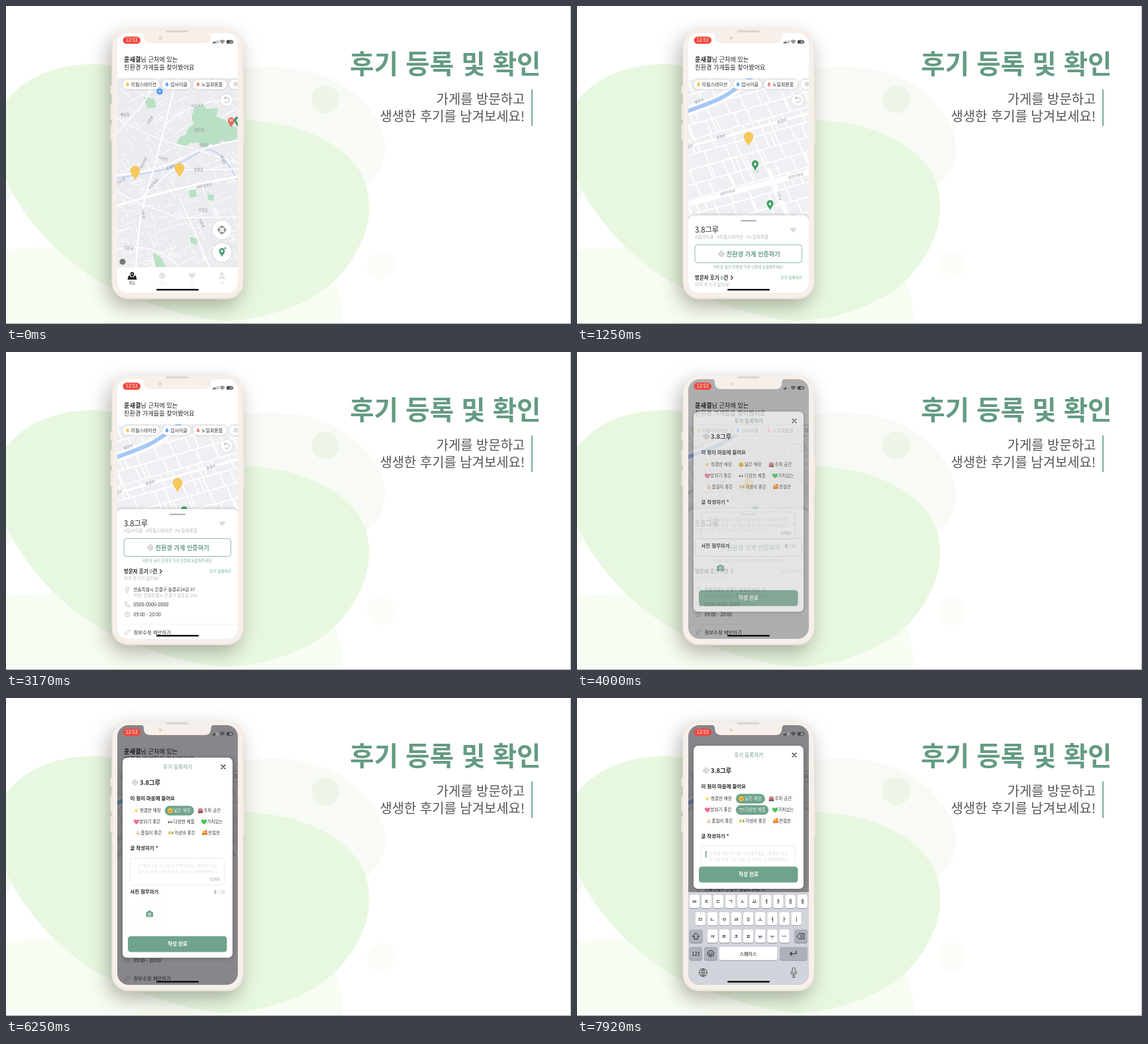
An HTML page that plays this animation: 853x480 px, repeating every 8 s.

```html
<!DOCTYPE html>
<html lang="ko">
<head>
<meta charset="utf-8">
<style>
html, body { margin: 0; width: 100%; height: 100%; overflow: hidden; background: #fff; }
svg { display: block; width: 853px; height: 480px; }
text { font-family: "Noto Sans CJK KR", "Noto Sans CJK", "Noto Sans", sans-serif; white-space: pre; }
.lift { filter: drop-shadow(0 .8px 1.5px rgba(0,0,0,.16)); }
</style>
</head>
<body>
<svg id="stage" viewBox="0 0 853 480"></svg>
<script>
const GREEN = '#649b82', BUTTON = '#70a38b', INK = '#222', PALE = '#b4b4b4';
const LOOP = 8000;

// Markup helpers
const text = (x, y, size, str, fill = INK, more = '') =>
  `<text x="${x}" y="${y}" font-size="${size}" fill="${fill}" ${more}>${str}</text>`;
const rect = (x, y, w, h, r, fill, more = '') =>
  `<rect x="${x}" y="${y}" width="${w}" height="${h}" rx="${r}" fill="${fill}" ${more}/>`;
const dot = (x, y, r, fill, more = '') => `<circle cx="${x}" cy="${y}" r="${r}" fill="${fill}" ${more}/>`;
const fillPath = (d, fill, more = '') => `<path d="${d}" fill="${fill}" ${more}/>`;
const line = (d, color, w = 1, more = '') =>
  `<path d="${d}" fill="none" stroke="${color}" stroke-width="${w}" stroke-linecap="round" stroke-linejoin="round" ${more}/>`;
const group = (id, body, more = '') => `<g id="${id}" ${more}>${body}</g>`;
const at = (x, y, body, s = 1) => `<g transform="translate(${x} ${y}) scale(${s})">${body}</g>`;
const MID = ' text-anchor="middle"', END = ' text-anchor="end"';
const BOLD = ' font-weight="700"', MEDIUM = ' font-weight="500"';

function seeded(seed) {
  return () => (seed = (seed * 16807) % 2147483647) / 2147483647;
}

// Icons, drawn around 0,0
const heart = color => fillPath('M0 4C-6 0-5-4-2.5-4Q-.8-4 0-2.3Q.8-4 2.5-4C5-4 6 0 0 4Z', color);
const drop = color => fillPath('M0-3.6C1-1.8 2.2-.6 2.2 1A2.2 2.2 0 0 1-2.2 1C-2.2-.6-1-1.8 0-3.6Z', color) +
  dot(0, 1.2, .8, '#fff', 'opacity=".7"');
const clover = [[0, -2.6], [-2.6, 0], [2.6, 0], [0, 2.6]].map(([x, y]) => dot(x, y, 2.5, '#d5d9d7')).join('') +
  line('M-2-2L2 2M2-2L-2 2', '#eef0ef', .5);
const marker = color => fillPath('M0 11.8C-1.6 7-7.2 3.2-7.2-2.7A7.2 7.2 0 0 1 7.2-2.7C7.2 3.2 1.6 7 0 11.8Z', color);
const tree = fillPath('M0-6L2.6-2.6H1.4L3.2 0H.7V2H-.7V0H-3.2L-1.4-2.6H-2.6Z', '#fff');
const face = dot(0, 0, 4, '#fbc638') + dot(-1.4, -.8, .6, '#6a4418') + dot(1.4, -.8, .6, '#6a4418') +
  line('M-1.7 1.2Q0 3 1.7 1.2', '#80501c', .8);
const eye = x => `<ellipse cx="${x}" rx="1.8" ry="2.6" fill="#fff" stroke="#bbb" stroke-width=".4"/>` + dot(x - .3, .4, 1.1, '#222');
const emoji = {
  spark: fillPath('M-.5-4Q0-.5 3 0Q0 .5-.5 4Q-1 .5-4 0Q-1-.5-.5-4Z', '#f8cf55') + dot(3, -3, .8, '#f8cf55'),
  face,
  car: fillPath('M-4 0L-2.6-3.4H2.6L4 0V3.5H-4Z', '#c9463f') + fillPath('M-2.8-.4L-2-2.5H2L2.8-.4Z', '#8fc3e6') +
    rect(-4, 2, 8, 1.6, .5, '#55474d') + dot(-2.6, 1, .7, '#fff') + dot(2.6, 1, .7, '#fff'),
  pink: heart('#f0719c'),
  eyes: eye(-2) + eye(2),
  green: heart('#42c655'),
  thumb: rect(-2.6, -.8, 5.6, 4.6, 1.5, '#f2cdb4') + line('M-1 0L.2-3.2', '#f2cdb4', 2),
  bill: rect(-4, -2.4, 8, 4.8, .6, '#d8bd68') + rect(-1.2, -2.4, 2.4, 4.8, 0, '#f3ecc9') + dot(2.4, 0, 1, '#6d9c5c'),
  love: face + at(-2.8, 2.3, heart('#ec4a55'), .38) + at(3, 1.8, heart('#ec4a55'), .38) + at(2.2, -3, heart('#ec4a55'), .35)
};

// Backdrop
const backdrop =
  fillPath('M330 100C380 88 450 85 505 117C550 145 577 190 572 222C567 255 550 268 530 277L330 275Z', '#f8fbf5') +
  fillPath('M0 368C80 355 420 370 495 412C505 432 508 455 508 480H0Z', '#f8fdf4') +
  dot(-6, 280, 14, '#f5faf2') +
  fillPath('M0 144C32 101 90 86 140 88C220 93 260 170 358 172C430 174 502 198 535 250C560 298 550 350 508 402C468 450 390 475 330 475C280 473 215 450 165 428C92 395 28 325 0 262Z', '#e8f8e0') +
  dot(482, 141, 21, '#edf5e8') + dot(566, 391, 21, '#fafdf8') +
  text(807.5, 102, 39.6, '후기 등록 및 확인', GREEN, END + BOLD) +
  text(783.3, 148, 19.9, '가게를 방문하고', '#555', END) +
  text(783.3, 173.5, 19.9, '생생한 후기를 남겨보세요!', '#555', END) +
  rect(793.2, 126, 1.7, 55, 0, GREEN) +
  rect(0, 479, 853, 1, 0, '#9a9a9a') + rect(852, 0, 1, 480, 0, '#b5b5b5');

// Maps
const label = (x, y, str, turn = 0, size = 5.2) =>
  text(x, y, size, str, '#888d96', `${MID} transform="rotate(${turn} ${x} ${y})"`);
const road = (d, w) => line(d, '#e3e5ea', w + .6) + line(d, '#fff', w);

function cityMap() {
  const rnd = seeded(77);
  let lanes = '';
  for (let i = 0; i < 430; i++) {
    const x = 165 + rnd() * 190, y = 105 + rnd() * 300;
    const a = (rnd() < .5 ? -.28 : 1.15) + (y < 230 ? -.3 : 0) + (rnd() - .5) * .2;
    const len = 6 + rnd() * 18;
    lanes += `M${x.toFixed(1)} ${y.toFixed(1)}l${(len * Math.cos(a)).toFixed(1)} ${(len * Math.sin(a)).toFixed(1)}`;
  }
  const park = '#bbdfc5';
  return rect(60, 60, 400, 440, 0, '#ebecef') + line(lanes, '#fff', .9) +
    fillPath('M257 208L262 198L272 194L274 186L283 178L280 168L285 152L298 150L303 155L320 154L318 166L332 173L340 180L349 184V200L335 206L326 203L318 211L309 208L300 214L290 206L278 207L270 213Z', park) +
    fillPath('M208 137L224 140L227 153L213 155Z M276 279L287 277L288 288L277 289Z M304 283L315 286L313 294L305 293Z M222 372L234 380L242 394H226Z M278 348L290 352L288 361L279 358Z M311 109L325 117L319 126L308 122Z', park) +
    line('M168 260Q215 252 243 246L272 232L298 217Q322 210 349 262', '#b4cef5', 1.5) +
    road('M168 255Q225 250 262 231T349 203', 2.2) + road('M160 304Q260 272 355 257', 3.6) +
    road('M196 400Q199 320 214 275T258 105', 2.6) + road('M160 165Q220 200 262 210T355 240', 1.6) +
    road('M160 200L205 150L232 105', 1.8) + road('M240 180Q280 140 355 140', 1.8) +
    road('M165 278L196 296L262 320L355 318', 1.6) + road('M262 290Q285 340 310 400', 2) +
    road('M160 370Q220 350 262 395', 1.6) + road('M196 296L250 248L355 246', 1.8) +
    label(292, 189, '달온동', 0, 5.6) + label(291, 249, '솔결로') + label(299, 212, '별온로') +
    label(300, 273, '남온순환로', -10) + label(209, 238, '새온대로', -62) + label(237, 232, '다온로', 15) +
    label(249, 245, '온결로', -18) + label(180, 166, '해온동') + label(289, 152, '여온대로', -8) +
    label(219, 173, '가온로', -60) + label(224, 270, '아온동길', -50) + label(298, 310, '은온로') +
    label(186, 367, '미온로') + label(205, 314, '나온로', 84) + label(294, 329, '라온로', 62) +
    label(326, 233, '해결로', 70) + label(174, 266, '온32길', -30);
}

function streetMap() {
  const rnd = seeded(41);
  let lanes = '';
  for (let v = -242; v < 260; v += 22) {
    lanes += `M-330 ${v}H330`;
    for (let u = -330 + rnd() * 20; u < 330; u += 13 + rnd() * 22) lanes += `M${u.toFixed(1)} ${v}v${rnd() < .3 ? 44 : 22}`;
  }
  return rect(-400, -300, 1500, 1200, 0, '#eff0f3') +
    `<g transform="matrix(.96 -.27 .4 .92 259 200)">${line(lanes, '#fff', 1.9)}</g>` +
    line('M120 174Q190 152 215 140T310 70', '#fff', 14) +
    line('M120 174Q190 152 215 140T310 70', '#a6c6f6', 6) +
    road('M20 254L500 120', 4) + road('M20 337L520 207', 8.5) + road('M290 248L350 400', 6) +
    label(185, 145, '별온로', -20) + label(218, 199, '솔결로', -17) + label(310, 175, '솔결로', -16) +
    label(169, 214, '솔결로', -16) + label(228, 283, '남온순환로', -15) + label(331, 258, '남온순환로', -15) +
    label(304, 287, '남온로', 80);
}

const chip = (x, w) => rect(x, 111, w, 14.5, 7.2, '#fff', 'class="lift" stroke="#e2e2e2" stroke-width=".6"');
const chipTag = (x, w, str, color) =>
  chip(x, w) + at(x + 7.5, 118, drop(color)) + text(x + 12.5, 120.8, 7, str, '#333');

const floating =
  dot(326, 338, 14.3, '#fff', 'class="lift"') + dot(326, 338, 5, 'none', 'stroke="#444" stroke-width="1"') +
  line('M326 331.8v3.6M326 340.6v3.6M319.8 338h3.6M328.6 338h3.6', '#444', 1) +
  dot(326, 372, 14.3, '#fff', 'class="lift"') + at(326, 371.5, marker('#579a7c') + dot(0, -2.6, 2.6, '#fff'), .62) +
  line('M329.5 365.5h3M331 364v3', '#579a7c', 1) +
  dot(176, 386, 4.5, '#777');

const tabs = rect(168, 394, 182, 45, 0, '#fff') + line('M168 394H350', '#e8e8e8', .6) +
  fillPath('M185 407h2l1.5 2.5h4L194 407h2l1.5 6h-14Z', INK) + at(190.5, 405.5, marker(INK) + dot(0, -2.6, 2.5, '#fff'), .4) +
  text(190.5, 420, 5.4, '지도', INK, MID) +
  dot(236, 407, 5, '#e6e6e6') + text(236, 420, 5.4, '후기', '#e4e4e4', MID) +
  at(281, 407, heart('#e2e2e2'), 1.15) + text(281, 420, 5.4, '찜', '#e4e4e4', MID) +
  dot(326, 404.5, 2.7, '#e2e2e2') + fillPath('M321 412Q321 408 326 408T331 412Z', '#e2e2e2') + text(326, 420, 5.4, 'MY', '#e4e4e4', MID);

// Store sheet, with its top edge at 0
const sheet = rect(168, 0, 182, 380, 8, '#fff', 'style="filter:drop-shadow(0 -1px 2px rgba(0,0,0,.2))"') +
  rect(247, 7, 24, 2.2, 1.1, '#b5b5b5') +
  text(178, 25.5, 11.2, '3.8그루', INK, MEDIUM) + at(326.5, 22, heart('#dcdcdc'), .95) +
  text(178, 35, 6.6, '#업사이클', PALE) + text(211, 35, 6.6, '#리필스테이션', PALE) + text(255, 35, 6.6, '#노일회용품', PALE) +
  rect(178, 44.5, 161.5, 27, 4, '#fff', 'stroke="#83b09b" stroke-width=".9"') + at(218, 58.2, clover) +
  text(225.5, 61.5, 9.2, '친환경 가게 인증하기', GREEN, BOLD) +
  text(259, 79.7, 5.5, '버튼을 눌러 친환경 가게 인증에 동참해주세요!', '#83aa97', MID) +
  text(178, 97, 7.5, `방문자 후기 <tspan fill="${GREEN}">0</tspan>건`, INK, BOLD) + line('M232.5 91.5l2.6 2.7l-2.6 2.7', INK, 1.1) +
  text(340, 96, 5.6, '후기 등록하기', '#5caa7c', END) + text(178, 106.5, 6.5, '아직 후기가 없어요!', PALE) +
  line('M183 126C180 122 180 117 183 117S186 122 183 126M182 120.5h2', '#aaa', .7) +
  text(192.5, 123.5, 6.6, '한솔특별시 은결구 솔결로24길 37', '#333') +
  text(192.5, 132.5, 6.4, '지번: 한솔특별시 은결구 달온동 264', PALE) +
  line('M180 141q-1 6 6 7l1-2l-2-1.5l-1 1q-2-1-2.4-2.5l1-1l-1-2Z', '#aaa', .7) + text(192.5, 147, 7.2, '0500-0000-0000', '#333') +
  dot(183, 159, 3.6, 'none', 'stroke="#aaa" stroke-width=".7"') + line('M183 157v2.2h1.8', '#aaa', .7) + text(192.5, 161.7, 7, '09:00 - 20:00', '#333') +
  line('M168 174H350', '#eee', .8) + line('M180 189l.8-2.6l4.4-4.4l1.8 1.8l-4.4 4.4Z', '#aaa', .7) +
  text(192.5, 188.5, 7.4, '정보수정 제안하기', '#333');

// Review dialog, with its top edge at 0
const choices = [
  [[189, 48, 197, 202, 'spark', '청결한 매장'], [240, 43.5, 248, 253, 'face', '넓은 매장'], [286, 42, 293.5, 298.5, 'car', '주차 공간']],
  [[189, 47, 197, 201.5, 'pink', '분위기 좋은'], [240, 49, 248, 253, 'eyes', '다양한 제품'], [291, 40, 299, 303.5, 'green', '가치있는']],
  [[189, 49, 199, 203.5, 'thumb', '품질이 좋은'], [241, 48, 249, 254, 'bill', '가성비 좋은'], [292, 36, 300, 305, 'love', '친절한']]
];
const choice = ([x, w, iconX, textX, icon, str], y, id) =>
  rect(x, y - 7, w, 14, 7, '#fff', `id="pill${id}" stroke="#f6f6f6" stroke-width=".6"`) +
  at(iconX, y, emoji[icon], .95) + text(textX, y + 2.4, 6.5, str, '#333', `id="word${id}"`);

const dialogBody =
  text(259, 16.6, 7.5, '후기 등록하기', GREEN, MID + MEDIUM) + line('M325 11l6 6M331 11l-6 6', INK, 1.1) +
  at(195, 37.5, clover) + text(202, 41, 9.3, '3.8그루', INK, BOLD) +
  text(187.5, 64.3, 7.4, '이 점이 마음에 들어요', INK, BOLD) +
  choices.map((row, r) => row.map((c, i) => choice(c, [80, 97, 113.5][r], r * 3 + i)).join('')).join('') +
  text(187.5, 139, 7.4, '글 작성하기 *', INK, BOLD) +
  rect(187.5, 151.5, 142, 41, 4, '#fff', 'stroke="#e6e6e6" stroke-width=".8"') +
  text(259, 165.3, 6.1, '가게에 대한 후기를 작성해주세요. (불쾌한 가입', '#dedede', MID) +
  text(259, 174, 6.1, '후기를 위해 다른 욕설 및 비하는 자제해주세요.)', '#dedede', MID) +
  rect(194, 158.5, 1.3, 10.5, .6, '#4f9474', 'id="caret"') +
  text(323, 186.2, 5.8, '0/500', '#999', END) +
  text(187.5, 205.2, 7.4, '사진 첨부하기', INK, BOLD) + text(330, 205, 6, '<tspan fill="#444">0</tspan> / 10', '#aaa', END) +
  rect(194, 217, 45, 38, 4, '#fefefe') +
  rect(211.5, 232.5, 10.5, 8, 1.2, BUTTON) + rect(214.5, 231, 4.5, 3, .8, BUTTON) + dot(216.7, 236.5, 2.3, '#fff') + dot(216.7, 236.5, 1.3, BUTTON);

const dialog = `<clipPath id="dialogClip"><rect id="dialogHole" x="176" width="166" rx="7"/></clipPath>` +
  `<rect id="dialogCard" x="176" width="166" rx="7" fill="#fff" style="filter:drop-shadow(0 1px 3px rgba(0,0,0,.25))"/>` +
  `<g clip-path="url(#dialogClip)">` + group('dialogBody', dialogBody) +
  group('submit', rect(176, -5, 166, 60, 0, '#fff') + rect(184, 0, 149.5, 24, 4.5, BUTTON) + text(259, 14.5, 7.6, '작성 완료', '#fff', MID + BOLD)) + '</g>';

// Keyboard
const key = (x, y, w, str, fill = '#fff', size = 8.5) =>
  rect(x, y + .8, w, 20, 3, '#898b91') + rect(x, y, w, 20, 3, fill) + text(x + w / 2, y + 13.2, size, str, '#111', MID);
const keyRow = (chars, x, y) => [...chars].map((c, i) => key(x + i * 18.1, y, 15.3, c)).join('');
const GREY = '#abb0ba';
const keyboard = rect(168, 293, 182, 145, 0, '#d1d4da') +
  keyRow('ㅂㅈㄷㄱㅅㅛㅕㅑㅐㅔ', 169.6, 297) + keyRow('ㅁㄴㅇㄹㅎㅗㅓㅏㅣ', 178.6, 323.3) + keyRow('ㅋㅌㅊㅍㅠㅜㅡ', 196.7, 349.6) +
  key(169.6, 349.6, 20, '', GREY) + line('M179.6 355l5 5h-2.6v4h-4.8v-4h-2.6Z', '#222', 1) +
  key(328, 349.6, 20, '', GREY) + line('M332 359.6l3.5-4h7.5v8h-7.5ZM337 357.6l4 4M341 357.6l-4 4', '#222', .9) +
  key(169.6, 375.8, 19.5, '123', GREY, 7) + key(192, 375.8, 20, '', GREY) +
  dot(202, 385.8, 4.6, 'none', 'stroke="#222" stroke-width="1"') + dot(200.3, 384.4, .7, '#222') + dot(203.7, 384.4, .7, '#222') + line('M199.5 387h5q-2.5 3-5 0', '#222', .8) +
  key(214.7, 375.8, 87.6, '스페이스', '#fff', 7) + key(306, 375.8, 42, '', GREY) + line('M331 382v4h-9M324.5 383.3l-2.7 2.7l2.7 2.7', '#222', 1.1) +
  dot(190.3, 414.5, 6, 'none', 'stroke="#444" stroke-width=".9"') + line('M184.3 414.5h12M190.3 408.5v12M186 410.5q4.3 2 8.6 0M186 418.5q4.3-2 8.6 0M190.3 408.5q-5.5 6 0 12q5.5-6 0-12', '#444', .7) +
  rect(325, 407, 4.4, 9, 2.2, 'none', 'stroke="#444" stroke-width=".9"') + line('M322.8 413q0 5.3 4.4 5.3t4.4-5.3M327.2 418.3v3M324.8 421.3h4.8', '#444', .9);

const status = rect(176.5, 46.3, 26.5, 10.8, 5.4, '#f0473d') + text(189.7, 54.3, 7.2, '12:53', '#fff', MID + MEDIUM) +
  rect(312, 54.4, 1.6, 2, .4, INK) + rect(314.4, 53.4, 1.6, 3, .4, INK) + rect(316.8, 52.6, 1.6, 3.8, .4, '#aaa') + rect(319.2, 51.6, 1.6, 4.8, .4, '#aaa') +
  line('M323.3 53.2q3.2-2.8 6.4 0M324.7 54.8q1.8-1.5 3.6 0', INK, 1.1) + dot(326.5, 56, .8, INK) +
  rect(333, 51.6, 9.5, 5.2, 1.5, '#444') + rect(337.5, 52.4, 4, 3.6, .6, '#999') + rect(343, 53.3, .8, 1.8, .4, '#555');

// Phone
const SHELL = '#f7efe9', EDGE = '#f0e6df';
const sideKey = (x, y, h) => rect(x, y, 3, h, 1, EDGE);
const shell =
  rect(159.5, 35.5, 199, 407, 25, EDGE, 'style="filter:drop-shadow(-5px 11px 15px rgba(70,62,54,.4))"') +
  sideKey(157.5, 120, 13) + sideKey(157.5, 147, 25) + sideKey(157.5, 179, 24) + sideKey(357, 157, 50) +
  rect(161, 36, 196.5, 404, 24, SHELL);

const notch = fillPath('M203 40.5Q208 41 208 46Q208 56 219 56H299Q309.5 56 309.5 46Q309.5 41 314 40.5Z', SHELL) +
  rect(241.5, 36.8, 34, 3, 1.5, '#dbd3ce') + dot(233, 48.3, 2.6, '#e2d8d1');

const home = rect(168, 40, 182, 69, 0, '#fff') +
  text(178, 83.8, 9.2, `<tspan ${BOLD}>윤새결</tspan>님 근처에 있는`) + text(178, 95.8, 9.2, '친환경 가게들을 찾아봤어요');

const mapArea = '<g clip-path="url(#mapClip)">' + group('city', cityMap()) + group('street', streetMap()) +
  group('cityPins', group('subway', dot(0, 0, 6, '#9cc3fb', 'opacity=".6"') + dot(0, 0, 4, '#3f86ee') + dot(0, 0, 1.5, 'none', 'stroke="#fff"')) +
    group('hospital', marker('#e2675c') + text(0, .6, 9, 'H', '#fff', MID + BOLD)) +
    group('farPark', marker('#41a06a') + tree) + group('otherStore', marker('#f6c75a'))) +
  group('streetPins', at(269, 240, marker('#3c9e62') + tree, .7) + at(291.5, 300, marker('#3c9e62') + tree, .7) +
    text(270, 250.8, 4.6, '공원', '#8fb79c', MID)) +
  group('store', marker('#f6c75a')) +
  group('floating', floating) +
  chipTag(176, 56, '리필스테이션', '#f4bd3e') + chipTag(235.5, 43.5, '업사이클', '#4c9df0') + chipTag(282.5, 50.5, '노일회용품', '#ee7a66') +
  chip(337, 40) + text(342.5, 120.8, 7, '기타', '#777') +
  dot(333, 142, 9, '#fff', 'opacity=".85" class="lift"') + line('M330 139.5a4 4 0 1 1 .6 5.4M330 139.5v-2.5M330 139.5h2.6', '#a5a5a5', .8) + '</g>';

document.getElementById('stage').innerHTML =
  `<defs><clipPath id="screen">${rect(168, 41, 182, 392, 17, '#000')}</clipPath>` +
  `<clipPath id="mapClip">${rect(168, 109, 182, 285, 0, '#000')}</clipPath></defs>` +
  backdrop + shell + '<g clip-path="url(#screen)">' + rect(168, 41, 182, 392, 0, '#fff') + mapArea + tabs + home +
  group('sheet', sheet) + rect(168, 41, 182, 392, 0, '#08040c', 'id="dim"') + group('dialog', dialog) +
  group('keyboard', keyboard) + status + rect(227, 427, 64, 2.4, 1.2, '#111') + '</g>' + notch;

// Motion
const el = {};
document.querySelectorAll('[id]').forEach(node => el[node.id] = node);
const set = (id, attrs) => Object.entries(attrs).forEach(([k, v]) => el[id].setAttribute(k, v));
const move = (id, x, y, s = 1) => set(id, { transform: `translate(${x} ${y}) scale(${s})` });
const clamp = v => Math.min(1, Math.max(0, v));
const span = (t, from, to) => clamp((t - from) / (to - from));
const out = p => 1 - (1 - p) ** 3;
const inOut = p => p * p * (3 - 2 * p);
const mix = (a, b, p) => a + (b - a) * p;

function select(id, on) {
  set('pill' + id, { fill: on ? BUTTON : '#fff', stroke: on ? BUTTON : '#f6f6f6' });
  set('word' + id, { fill: on ? '#e8f3ed' : '#333' });
}

function render(t) {
  const zoom = inOut(span(t, 250, 800));
  const scale = 4 ** zoom;
  const x = mix(262, 259, zoom), y = mix(247, 200, zoom);
  const follow = (id, px, py, s) => move(id, x + (px - 262) * scale, y + (py - 247) * scale, s);
  const street = span(zoom, .35, .8);
  set('city', { transform: `translate(${x} ${y}) scale(${scale}) translate(-262 -247)`, visibility: street < 1 ? 'visible' : 'hidden' });
  set('street', { transform: `translate(${x} ${y}) scale(${scale / 4}) translate(-259 -200)`, opacity: street });
  set('streetPins', { opacity: span(zoom, .8, 1) });
  set('cityPins', { visibility: zoom < 1 ? 'visible' : 'hidden' });
  move('store', x, y);
  follow('otherStore', 195, 251);
  follow('subway', 232, 129);
  follow('hospital', 340, 175, .7);
  follow('farPark', 349.5, 174, .7);
  set('floating', { opacity: 1 - span(t, 300, 450) });

  const typing = out(span(t, 7580, 7840));
  const peek = out(span(t, 400, 850)), drag = inOut(span(t, 2000, 2550));
  move('sheet', 0, mix(440, 316, peek) - 79 * drag - 70 * typing);

  const shown = span(t, 3790, 4100);
  set('dim', { opacity: .48 * shown });
  set('dialog', { opacity: shown, visibility: shown ? 'visible' : 'hidden' });
  const top = mix(90, 72, typing), height = mix(302, 216, typing);
  ['dialogCard', 'dialogHole'].forEach(id => set(id, { y: top, height }));
  move('dialogBody', 0, top);
  move('submit', 0, top + height - mix(32.5, 33.5, typing));
  select(1, t >= 5500);
  select(4, t >= 7000);
  set('caret', { opacity: t >= 7600 ? 1 : 0 });
  move('keyboard', 0, 145 * (1 - typing));
}

const start = performance.now();
function tick() {
  render((performance.now() - start) % LOOP);
  requestAnimationFrame(tick);
}
render(0);
requestAnimationFrame(tick);
</script>
</body>
</html>
```
